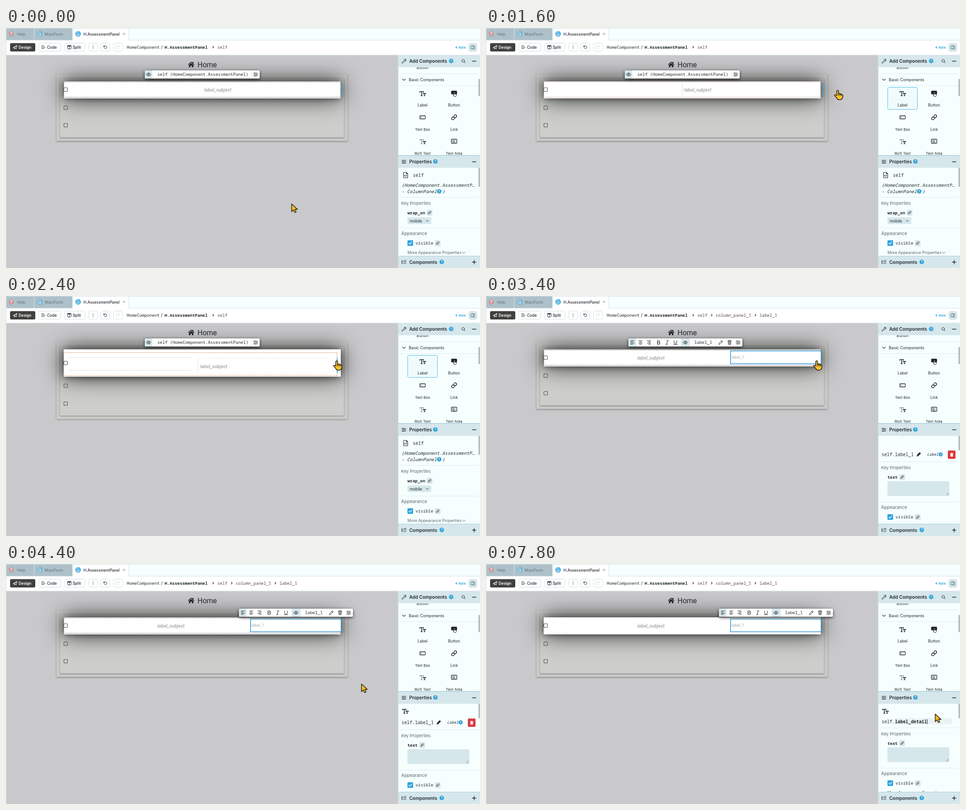
Recreate the animation shown at these times as an HTML page with a canvas. Size 1052 by 532 pixels, loop 8000 ms.

```html
<!DOCTYPE html>
<html lang="en">
<head>
<meta charset="utf-8">
<title>Form designer</title>
<style>
html, body { margin: 0; width: 100%; height: 100%; overflow: hidden; background: #c9c9cb; }
canvas { display: block; }
</style>
</head>
<body>
<canvas id="stage" width="1052" height="532"></canvas>
<script>
const c = document.getElementById('stage').getContext('2d');
const LOOP = 8000, TICK = 200;
const INK = '#22292e', SOFT = '#5c676d', BLUE = '#2ea3dc', PALE = '#d6e7ec', MINT = '#f6fffe', EDGE = '#cfe2e6';

const ui = (size, weight = 400) => `${weight} ${size}px Inter, "Open Sans", sans-serif`;
const mono = (size, style = '') => `${style} ${size}px "Noto Sans Mono", "DejaVu Sans Mono", monospace`;
const roboto = (size, style = '') => `${style} ${size}px Roboto, sans-serif`;

function text(s, x, y, font, color = INK, align = 'left') {
  c.font = font;
  c.fillStyle = color;
  c.textAlign = align;
  c.fillText(s, x, y);
}

function box(x, y, w, h, fill, stroke, r = 0, lw = 1) {
  c.beginPath();
  c.roundRect(x, y, w, h, r);
  if (fill) { c.fillStyle = fill; c.fill(); }
  if (stroke) { c.strokeStyle = stroke; c.lineWidth = lw; c.stroke(); }
}

function line(x1, y1, x2, y2, color, w = 1, dash = []) {
  c.beginPath();
  c.setLineDash(dash);
  c.moveTo(x1, y1);
  c.lineTo(x2, y2);
  c.strokeStyle = color;
  c.lineWidth = w;
  c.stroke();
  c.setLineDash([]);
}

// SVG path drawn around a centre point
function icon(d, x, y, color = INK, w = 1, fill) {
  const p = new Path2D(d);
  c.save();
  c.translate(x, y);
  c.lineJoin = c.lineCap = 'round';
  if (fill) { c.fillStyle = fill; c.fill(p); }
  if (w) { c.strokeStyle = color; c.lineWidth = w; c.stroke(p); }
  c.restore();
}

function shadowed(color, blur, dy, draw) {
  c.save();
  c.shadowColor = color;
  c.shadowBlur = blur;
  c.shadowOffsetY = dy;
  draw();
  c.restore();
}

const ICON = {
  plane: 'M-4 1 4 -4 2.5 4 0 2 -1.5 4 -1.5 1.5 4 -4M-4 1 -1.5 1.5',
  list: 'M-4 -3H1M-4 0H4M-4 3H2',
  undo: 'M-3 -3.5V-.5H0M-3 -.5A3.4 3.4 0 1 1 -1.5 3',
  redo: 'M3 -3.5V-.5H0M3 -.5A3.4 3.4 0 1 0 1.5 3',
  eye: 'M-5 0Q0 -7 5 0Q0 7 -5 0M1.8 0A1.8 1.8 0 1 1 -1.8 0A1.8 1.8 0 1 1 1.8 0',
  sliders: 'M-4.5 -3H4.5M-4.5 0H4.5M-4.5 3H4.5M-2 -4V-2M2 -1V1M-1 2V4',
  pencil: 'M-4 4 -3.2 1 2 -4.2 4.2 -2 -1 3.2ZM.8 -3 3 -.8',
  trash: 'M-4 -3H4M-1.5 -3V-4.5H1.5V-3M-3 -3 -2.5 4.5H2.5L3 -3M-1 -1V2.5M1 -1V2.5',
  wrench: 'M-4.5 3.5 .5 -1.5A2.7 2.7 0 0 1 4 -4.5L2.2 -2.7 3 -1.7 4.7 -3.5A2.7 2.7 0 0 1 1.5 .2L-3.3 4.7Z',
  search: 'M2.2 -.8A3 3 0 1 1 -3.8 -.8A3 3 0 1 1 2.2 -.8M1.4 1.4 4 4',
  tree: 'M-4.5 -4V3H-2M-4.5 -.5H-2M-1 -3.5H5M0 -.5H5M0 3H5',
  down: 'M-3.5 -1.7 0 1.7 3.5 -1.7',
  next: 'M-1 -2 1 0 -1 2',
  minus: 'M-4 0H4',
  plus: 'M-4 0H4M0 -4V4',
  close: 'M-2.2 -2.2 2.2 2.2M2.2 -2.2 -2.2 2.2',
  spark: 'M0 -3.2 .8 -.8 3.2 0 .8 .8 0 3.2 -.8 .8 -3.2 0 -.8 -.8Z',
  link: 'M-1.1 .55a2.75 2.75 0 0 0 4.15 .3l1.65 -1.65a2.75 2.75 0 0 0 -3.9 -3.9l-.95 .95M1.1 -.55a2.75 2.75 0 0 0 -4.15 -.3l-1.65 1.65a2.75 2.75 0 0 0 3.9 3.9l.95 -.95',
  chip: 'M-.7 .4a1.7 1.7 0 0 0 2.6 .2l1 -1a1.7 1.7 0 0 0 -2.4 -2.4l-.6 .6M.7 -.4a1.7 1.7 0 0 0 -2.6 -.2l-1 1a1.7 1.7 0 0 0 2.4 2.4l.6 -.6',
  doc: 'M-4.5 -6H1.5L4.5 -3V6H-4.5ZM1.5 -6V-3H4.5M-1 -.5 -2.5 1.2 -1 3M1 -.5 2.5 1.2 1 3',
  page: 'M-2.5 -3.5H1L2.5 -2V3.5H-2.5ZM-1 0H1M-1 1.7H1',
  house: 'M-7.5 0 0 -6.5 3 -4V-6H5V-2.2L7.5 0 6.6 1 0 -4.5 -6.6 1ZM-5 .8 0 -3.3 5 .8V6H1.5V2.2H-1.5V6H-5Z',
  tick: 'M-3 0 -.8 2.3 3.2 -2.3',
  arrow: 'M0 0V17L4 13.3 6.8 19 10 17.5 7.2 12H13Z',
  hand: 'M-2 1.5Q0 -1.5 2 1.5V7.5Q4 6 5.3 8Q7.3 7 8.3 9Q11 8.5 11.5 11Q12 20.5 5.5 21H2.5Q-.5 20.5 -2.5 16.5L-7 11.5Q-6 8.5 -2 11.5ZM2 7.5V11.5M5.3 8V11.5M8.3 9V12',
  beam: 'M-3 -8H-1Q0 -8 0 -7Q0 -8 1 -8H3M0 -7V7M-3 8H-1Q0 8 0 7Q0 8 1 8H3'
};

function help(x, y, r = 5, fill = BLUE) {
  c.beginPath();
  c.arc(x, y, r, 0, 7);
  c.fillStyle = fill;
  c.fill();
  text('?', x, y + 2.8, ui(r * 1.5, 600), '#fff', 'center');
}

function chip(x, y) {
  box(x - 6, y - 6.5, 12.5, 13, PALE, null, 2);
  icon(ICON.chip, x, y, INK, 0.9);
}

function bigT(x, y, gray) {
  icon('M-6 -3V-4.5H2V-3M-2 -4.5V4.5M-3.5 4.5H-.5', x, y, gray ? '#8c989d' : INK, 1.6);
  icon('M1.5 .8V-.5H7V.8M4.2 -.5V4.5M3.2 4.5H5.2', x, y, INK, 1.5);
}

function drawTop(added) {
  box(0, 0, 1052, 27, MINT);
  box(0, 27, 1052, 33, '#fff');
  box(0, 0, 62, 27, '#aec1ca');
  box(62.5, 0, 85, 27, '#aec1ca');
  line(62, 0, 62, 27, '#c3d3d9');
  line(0, 27, 1052, 27, EDGE);
  box(148, 0, 124, 28, '#fff');
  line(272.5, 0, 272.5, 27, EDGE);
  line(0, 0.5, 1052, 0.5, EDGE);
  help(12, 13, 6, '#cf9a9d');
  text('Help', 24, 16.5, ui(8.6), '#637680');
  for (const [x, col] of [[75, '#5fadd2'], [160, BLUE]]) {
    c.beginPath(); c.arc(x, 13, 6, 0, 7); c.fillStyle = col; c.fill();
    icon(ICON.page, x, 13, '#fff', 0.9);
  }
  text('MainForm', 86, 16.5, ui(8.7), '#637680');
  text('H.AssessmentPanel', 172, 16.5, ui(8.4, 500), INK);
  icon(ICON.close, 262, 13, '#7c898f', 0.9);

  box(9, 33.5, 56, 18.5, '#40403f', null, 3);
  icon(ICON.plane, 20, 42.5, '#fff');
  text('Design', 28, 46, ui(8.4, 600), '#fff');
  for (const [x, w] of [[72, 49], [129, 46], [183, 20], [210, 20], [238, 20]])
    box(x + 0.5, 33.5, w, 18, '#fff', EDGE, 3);
  icon(ICON.list, 83, 42.5);
  text('Code', 91, 46, ui(8.6, 500));
  box(136.5, 38.5, 8, 8, null, INK, 1);
  line(136.5, 40, 144.5, 40, INK, 1.5);
  line(140.5, 40, 140.5, 46, INK);
  text('Split', 148, 46, ui(8.7, 500));
  for (const y of [39, 42, 45]) box(192.3, y, 1.6, 1.6, INK, null, 0.8);
  icon(ICON.undo, 220, 42.5);
  icon(ICON.redo, 248, 42.5, '#d4dbdd');

  text('HomeComponent', 268, 46, mono(9.35));
  text('/', 344, 46, ui(10), INK);
  text('H.AssessmentPanel', 352, 46, mono(9.35, '600'));
  const trail = added ? [[469, 'self'], [510, 'column_panel_1'], [607, 'label_1']] : [[469, 'self']];
  for (const [x, s] of trail) {
    icon(ICON.next, x - 9, 42.5, INK, 1.1);
    text(s, x, 46, mono(9.35), '#58434c');
  }
  icon(ICON.spark, 999.5, 43, BLUE, 0, BLUE);
  text('New', 1004.5, 46, ui(7.5, 500), BLUE);
  box(1027.5, 34.5, 17, 17, PALE, '#bfd5dc', 3);
  box(1032, 39.5, 8, 7, null, '#44606c', 1);
  line(1037, 39.5, 1037, 46.5, '#44606c');
}

function drawForm(s) {
  const grow = s.spread ? 22.5 : 0;
  const rowH = 37.5 + grow;
  const row = () => box(128, 118.5, 615, rowH, '#fff');
  c.save();
  c.beginPath();
  c.rect(0, 60, 870, 472);
  c.clip();
  box(0, 60, 870, 472, '#c9c9cb');
  icon(ICON.house, 411, 81, INK, 0, INK);
  text('Home', 425, 87, roboto(16), INK);
  shadowed('rgba(0,0,0,.35)', 3, 1, () => box(112, 102, 646, 148.5 + grow, '#cacac9'));
  shadowed('rgba(0,0,0,.35)', 3, 1, () => box(120, 112, 630, 130.5 + grow, '#cdcdcb'));
  shadowed('rgba(0,0,0,.85)', 50, 0, row);
  shadowed('rgba(0,0,0,.6)', 14, 0, row);
  if (s.glow) box(743, 121, 5, 33, 'rgba(110,155,180,.65)');
  row();

  const rows = s.spread ? [148.5, 199, 238.5] : [136.5, 176.5, 215.5];
  for (const y of rows) box(128.5, y - 4, 8, 8, null, '#4d4d4d', 1.5, 1.1);

  if (s.spread) {
    const o = '#dc9f80', pale = '#e4e3e3';
    line(128, 125.5, 735, 125.5, o, 1, [3, 1]);
    line(128, 176.5, 735, 176.5, o, 1, [3, 1]);
    line(734.5, 126, 734.5, 176, o, 1, [3, 1]);
    line(139, 136.5, 411, 136.5, pale);
    line(139, 164.5, 411, 164.5, pale);
    line(441, 137.5, 714, 137.5, '#efeeee');
    line(431, 173.5, 714, 173.5, '#efeeee');
    line(426.5, 136, 426.5, 171, pale);
    line(735, 137, 735, 170, BLUE, 1.6);
  } else if (s.dashed) {
    c.setLineDash(s.dragging ? [2, 1] : [2.5, 1.5]);
    box(128.5, 119.5, 614, 34, null, s.dragging ? '#b59486' : '#666');
    c.setLineDash([]);
    if (s.dragging) {
      line(435.5, 123, 435.5, 151, '#dedede');
      line(748, 122, 748, 152, BLUE, 1.6);
    }
  }
  const [lx, ly] = s.spread ? [431, 160] : [s.added ? 336 : 440, 140.5];
  text('label_subject', lx, ly, roboto(10.5, 'italic bold'), '#b0b0b0');
  if (s.added) {
    box(542.75, 121.75, 201, 28.5, '#fff', '#3199d3', 0, 1.6);
    text('label_1', 545, 138.5, roboto(9.2, 'italic'), '#aaa');
  }
  drawFloat(s);
  c.restore();
}

function drawFloat(s) {
  const [x, y, w] = !s.added ? [308, 94, 255] : s.barMoved ? [517, 99, 253] : [316, 94, 253];
  shadowed('rgba(0,0,0,.75)', 6, 2, () => box(x, y, w, 18, '#fff', null, 2));
  const m = y + 9;
  if (!s.added) {
    box(x, y, 17, 18, PALE, null, [2, 0, 0, 2]);
    icon(ICON.eye, x + 8.5, m);
    text('self (HomeComponent.AssessmentPanel)', x + 28, m + 3, mono(9.35));
    line(x + 236.5, y, x + 236.5, y + 18, EDGE);
    icon(ICON.sliders, x + 246, m);
    return;
  }
  box(x, y, 17, 18, PALE, null, [2, 0, 0, 2]);
  box(x + 117, y, 19, 18, PALE);
  icon('M-4 -4H4M-4 -1.3H1M-4 1.3H4M-4 4H1', x + 9, m);
  icon('M-4 -4H4M-2.5 -1.3H2.5M-4 1.3H4M-2.5 4H2.5', x + 27, m);
  icon('M-4 -4H4M-1 -1.3H4M-4 1.3H4M-1 4H4', x + 45.5, m);
  icon('M-2.5 -4H.5A2 2 0 0 1 .5 0H-2.5ZM-2.5 0H1A2 2 0 0 1 1 4H-2.5Z', x + 67, m, INK, 1.2);
  icon('M-1 -4H3M1 -4 -1 4M-3 4H1', x + 86, m);
  icon('M-3 -4V0A3 3 0 0 0 3 0V-4M-4 4.5H4', x + 104.5, m);
  icon(ICON.eye, x + 126.5, m);
  text('label_1', x + 146.5, m + 3, mono(9.35));
  for (const dx of [55, 136, 194]) line(x + dx + 0.5, y, x + dx + 0.5, y + 18, '#e6eff1');
  icon(ICON.pencil, x + 205, m);
  icon(ICON.trash, x + 224.5, m);
  icon(ICON.sliders, x + 243.5, m);
}

function header(y, h, label, glyph, helpX, sign) {
  const m = y + h / 2;
  box(870, y, 182, h, PALE);
  icon(glyph, 883, m);
  text(label, 895, m + 3.5, ui(10, 600));
  help(helpX, m - 0.5);
  icon(sign, 1039, m, INK, 1.5);
}

function drawPalette(s) {
  box(870, 60, 182, 223, MINT);
  text('Button', 924.5, 91, ui(8.6), INK, 'center');
  line(870, 101.5, 1048, 101.5, '#dcebee');
  line(870, 127.5, 1048, 127.5, '#dcebee');
  icon(ICON.down, 883, 114.5, INK, 1.1);
  text('Basic Components', 894, 117.5, ui(8.9));
  if (s.picked) box(891.5, 131.5, 66, 49, '#f0fbfd', '#56b9e3', 3);
  const names = ['Label', 'Button', 'Text Box', 'Link', 'Rich Text', 'Text Area'];
  names.forEach((n, i) =>
    text(n, i % 2 ? 994.5 : 924.5, 174 + 53.5 * (i >> 1), ui(n.includes(' ') ? 8.2 : 8.6), INK, 'center'));
  bigT(924.5, 145.5);
  box(988, 139, 13, 8, INK, null, 1.5);
  icon('M-1 -3Q0 -4 1 -3V0L4 1Q4.5 5 2.5 5.5H-.5L-3 2 -1 2Z', 995.5, 146.5, INK, 1, '#fff');
  box(918.5, 194.5, 12, 7, null, INK, 1, 1.3);
  line(921, 196.5, 921, 199.5, INK);
  icon(ICON.link, 994.5, 198, INK, 1.5);
  bigT(924.5, 252, true);
  box(988.5, 246.5, 12, 9, null, INK, 1, 1.3);
  text('abc', 994, 252, ui(4.5, 600), INK, 'center');
  line(991, 253.5, 997, 253.5, INK, 0.8);
  box(1048.5, 113, 3.5, 38, '#b3bfc4');
  header(60, 27, 'Add Components', ICON.wrench, 988, ICON.minus);
  icon(ICON.search, 1015.5, 73.5);
}

function appearance(y) {
  line(870, y - 15.5, 1048, y - 15.5, '#dcebee');
  text('Appearance', 877, y, ui(10), SOFT);
  box(891, y + 11.5, 12.5, 12.5, BLUE, null, 2);
  icon(ICON.tick, 897, y + 18, '#fff', 1.4);
  text('visible', 909, y + 21, mono(9.35));
  chip(958, y + 18);
  text('More Appearance Properties', 891, y + 42, ui(8.8), SOFT);
  icon(ICON.down, 1016, y + 39, SOFT);
}

function drawProps(s) {
  box(870, 283, 182, 249, MINT);
  if (!s.added) {
    icon(ICON.doc, 887, 326, INK, 1.1);
    text('self', 903, 329.5, mono(10));
    text('(HomeComponent.AssessmentP…', 878, 352, mono(10, 'italic'));
    text('- ColumnPanel', 878, 365.5, mono(10, 'italic'));
    help(961.5, 362);
    text(')', 968, 365.5, mono(10, 'italic'));
    line(870, 375.5, 1048, 375.5, '#dcebee');
    text('Key Properties', 877, 391.5, ui(9.5), SOFT);
    text('wrap_on', 891, 412.5, mono(9.35, '600'));
    chip(940, 409.5);
    box(891, 420, 53, 14.5, PALE, null, 2);
    text('mobile', 896, 430.5, ui(8.7));
    icon('M-2.5 -1.2 0 1.2 2.5 -1.2', 935, 427.5);
    appearance(459);
  } else {
    const y = s.editing ? -4.3 : 0;
    if (s.glyph) bigT(886, 326.5);
    if (s.editing) {
      box(908, 342, 126, 13, '#e9f2f4');
      text('self.', 878, 353, mono(9.9));
      if (s.typed < 0) box(907.5, 344, 42, 11.5, '#4159c4');
      const word = s.typed < 0 ? 'label_1' : 'label_detail'.slice(0, s.typed);
      text(word, 907.6, 353, mono(9.9, '600'), s.typed < 0 ? '#fff' : INK);
      if (s.typed >= 0) {
        const cx = 908.5 + c.measureText(word).width;
        line(cx, 344, cx, 355, INK);
      }
    } else {
      text('self.label_1', 878, 354.5, mono(9.9));
      icon(ICON.pencil, 960.5, 351, INK, 1, INK);
      text('Label', 979, 354, mono(8.3, 'italic'));
      help(1009, 351, 4.5);
      box(1025, 342.5, 17, 18.5, '#dc3a41', null, 2);
      icon('M-3 -2.8H3M-1 -3.6H1M-2.3 -2V3.5H2.3V-2Z', 1033.5, 352, '#fff', 1, '#fff');
    }
    line(870, 367.5 + y, 1048, 367.5 + y, '#dcebee');
    text('Key Properties', 877, 384 + y, ui(9.5), SOFT);
    text('text', 891, 405 + y, mono(9.35, '600'));
    chip(923.5, 401.5 + y);
    box(891, 410.5 + y, 137.5, 33, PALE, null, 2);
    icon('M0 5 5 0M3 5 5 3', 1021.5, 436 + y, '#7d8b91', 0.9);
    appearance(472.3 + y);
  }
  box(1048.5, 310, 3.5, s.added ? 32 : 42, '#b3bfc4');
  header(283, 27, 'Properties', ICON.sliders, 953, ICON.minus);
  header(506, 26, 'Components', ICON.tree, 967, ICON.plus);
  line(870, 282.5, 1052, 282.5, '#8fc0d2');
  line(870, 505.5, 1052, 505.5, '#a5cbd8');
}

// time, x, y of the pointer's hot spot
const PATH = [
  [0, 634, 390], [200, 640, 385], [1000, 922, 143], [1200, 922, 143], [1600, 780.5, 138],
  [2000, 736, 143], [2400, 734, 143.5], [3600, 734, 143.5], [4200, 789, 266], [4400, 789, 266],
  [5400, 957, 348], [5800, 957, 348], [6600, 997, 332.5], [LOOP, 997, 332.5]
];

function pointer(t) {
  const i = Math.max(1, PATH.findIndex(p => p[0] >= t));
  const a = PATH[i - 1], b = PATH[i];
  const u = (t - a[0]) / (b[0] - a[0]);
  const e = u * u * (3 - 2 * u);
  return [a[1] + (b[1] - a[1]) * e, a[2] + (b[2] - a[2]) * e];
}

function drawPointer(t) {
  const [x, y] = pointer(t);
  if (t >= 5400 && t < 6000) {
    icon(ICON.beam, x, y, '#222', 3.4);
    icon(ICON.beam, x, y, '#f2bd2c', 1.1);
  } else if (t >= 1000 && t < 3800) {
    icon(ICON.hand, x, y, '#1b1a17', 1.5, '#fdc12d');
  } else {
    icon(ICON.arrow, x, y, '#1b1a17', 1.4, '#f7bd1f');
  }
}

function draw(t) {
  const s = {
    glow: t < 1000,
    picked: t >= 1000 && t < 3200,
    dragging: t >= 1400 && t < 3200,
    spread: t >= 1800 && t < 3200,
    added: t >= 3200,
    glyph: t >= 3800,
    barMoved: t >= 3800,
    dashed: t < 4800,
    editing: t >= 5600,
    typed: t < 7000 ? -1 : Math.round(2 + (t - 7000) / 80)
  };
  c.clearRect(0, 0, 1052, 532);
  drawForm(s);
  drawPalette(s);
  drawProps(s);
  drawTop(s.added);
  line(0, 60, 1052, 60, '#d5e3e6');
  line(0.5, 0, 0.5, 532, EDGE);
  line(870.5, 60, 870.5, 532, EDGE);
  drawPointer(t);
}

function frame() {
  const t = performance.now() % LOOP;
  draw(Math.floor(t / TICK) * TICK);
  requestAnimationFrame(frame);
}
frame();
</script>
</body>
</html>
```
